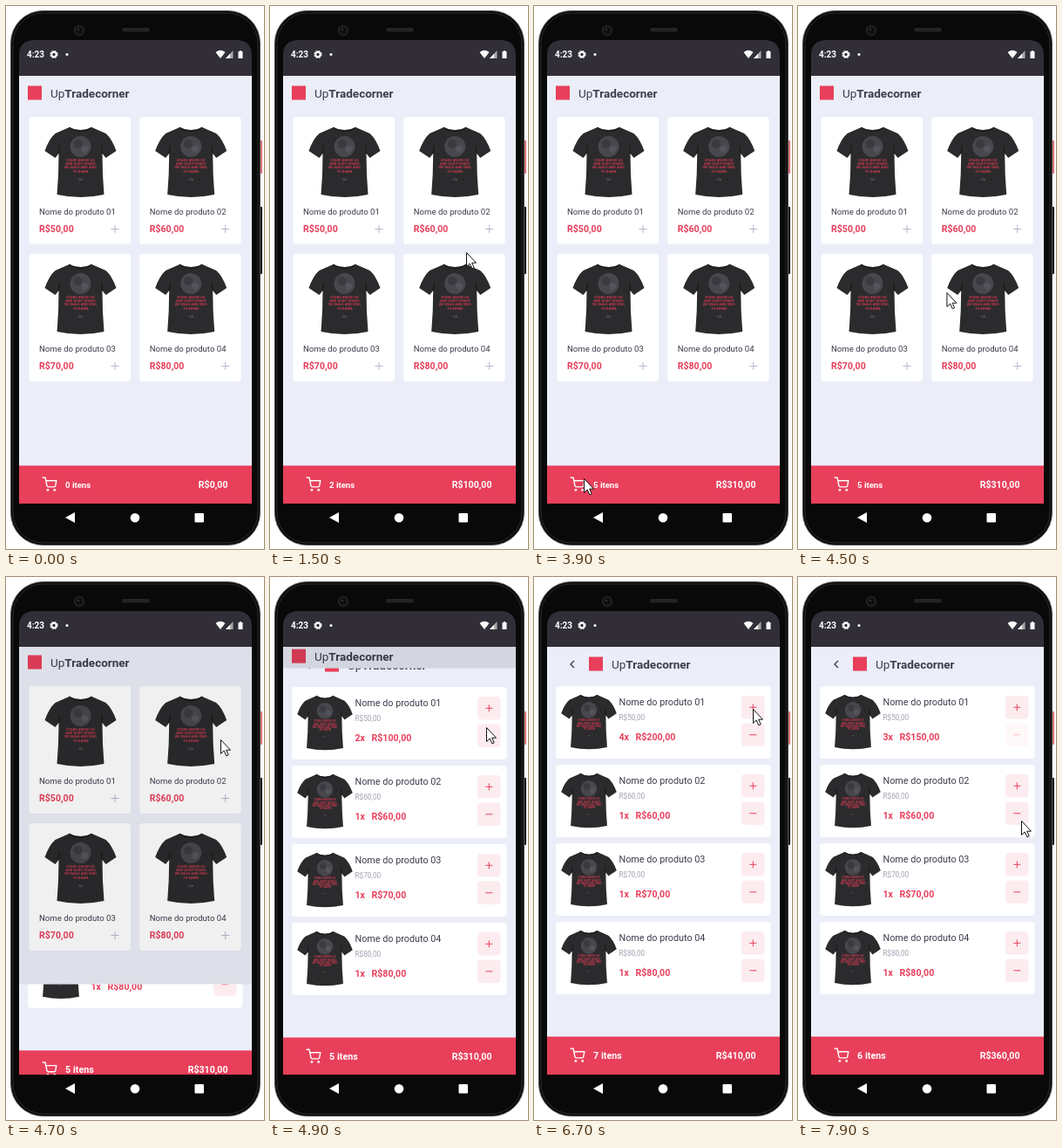
An HTML page for the animation above (8 s loop, 296 by 622 pixels).

```html
<!DOCTYPE html>
<html lang="pt-BR">
<head>
<meta charset="utf-8">
<style>
html, body { margin: 0; width: 100%; height: 100%; overflow: hidden; background: #fff; }
svg { font-family: Roboto, sans-serif; }
body > svg { display: block; }
</style>
</head>
<body>
<svg id="stage" width="296" height="622" viewBox="0 0 296 622"></svg>
<script>
const LOOP = 8000, STEP = 100;
const RED = '#e83f5b', INK = '#3d3d4d', PAGE = '#ebeef8';
const TOP = 80, BOTTOM = 570, HEIGHT = BOTTOM - TOP;
const OPEN_AT = 4677, OPEN_MS = 425;
const prices = [50, 60, 70, 80];

// time, product, change in quantity
const orders = [[800, 0, 1], [1200, 0, 1], [2000, 1, 1], [2600, 2, 1], [3300, 3, 1],
  [5800, 0, 1], [6500, 0, 1], [7700, 0, -1]];
// start, end, button sign
const presses = [[5500, 5700, 1], [6200, 6400, 1], [7700, 8000, -1]];
// time, x, y of the pointer tip
const route = [[200, 296, 350], [600, 127, 256], [1200, 127, 256], [1500, 225, 282],
  [1800, 253, 256], [2100, 253, 256], [2500, 127, 412], [2700, 127, 412], [3000, 254, 412],
  [3300, 254, 412], [3800, 57, 541], [4200, 57, 541], [4700, 246, 186], [5200, 251, 151],
  [6700, 251, 151], [7000, 254, 182], [7500, 254, 182], [7900, 256, 279]];

const money = n => `R$${n},00`;
const rect = (x, y, w, h, fill, r = 0, extra = '') =>
  `<rect x="${x}" y="${y}" width="${w}" height="${h}" rx="${r}" fill="${fill}" ${extra}/>`;
const circle = (x, y, r, fill) => `<circle cx="${x}" cy="${y}" r="${r}" fill="${fill}"/>`;
const path = (d, fill, extra = '') => `<path d="${d}" fill="${fill}" ${extra}/>`;
const line = (d, color, width = 1) => path(d, 'none', `stroke="${color}" stroke-width="${width}"`);
const text = (x, y, size, s, fill, weight = 400, anchor = 'start') =>
  `<text x="${x}" y="${y}" font-size="${size}" fill="${fill}" font-weight="${weight}" text-anchor="${anchor}">${s}</text>`;
const group = (x, y, k, body) => `<g transform="translate(${x} ${y}) scale(${k})">${body}</g>`;
const sign = (x, y, r, plus, color) =>
  line(`M${x - r} ${y}h${2 * r}` + (plus ? `M${x} ${y - r}v${2 * r}` : ''), color);

const shirt =
  path('M-13 1Q0 7 13 1L29 8Q36 14 41 28L29 36L25 31Q25 55 27 78Q0 84-27 78Q-25 55-25 31L-29 36L-41 28Q-36 14-29 8Z', '#2b2b2d') +
  line('M-13 1Q0 10 13 1M-25 31L-24 22M25 31L24 22', '#1b1b1d', 1.5) +
  circle(0, 23, 12, '#47474d') + circle(-3, 20, 5, '#3a3a40') + circle(5, 26, 4, '#54545b') +
  ['STARS ABOVE US', 'AND QUIET ROADS', 'WE WALK AND SING', 'TO DAWN'].map((s, i) =>
    text(0, 39.5 + i * 4.4, 4, s, '#c53a4e', 700, 'middle')).join('') +
  text(0, 61.5, 3, 'LUA', '#77777c', 400, 'middle');

function title(x) {
  return rect(x, 91.5, 16, 16, RED) +
    `<text x="${x + 26}" y="104.7" font-size="13.5" fill="${INK}">Up<tspan font-weight="700">Tradecorner</tspan></text>`;
}

function footer(counts, size) {
  const items = counts.reduce((a, b) => a + b);
  const total = counts.reduce((a, n, i) => a + n * prices[i], 0);
  const cart = '<g fill="none" stroke="#fff" stroke-width="2" stroke-linecap="round" stroke-linejoin="round">' +
    '<circle cx="9" cy="21" r="1"/><circle cx="20" cy="21" r="1"/>' +
    '<path d="M1 1h4l2.7 13.4a2 2 0 0 0 2 1.6h9.7a2 2 0 0 0 2-1.6L23 6H6"/></g>';
  return rect(15, 526.5, 267, 60, RED) + group(41.5, 539.5, .71, cart) +
    text(68, 552, size, items + ' itens', '#fff', 700) +
    text(254.5, 552.3, 10.6, money(total), '#fff', 700, 'end');
}

function home(counts) {
  const cards = prices.map((price, i) => group(i % 2 * 126.7, (i >> 1) * 157, 1,
    rect(26.5, 127, 116.5, 146, '#fff', 4) + group(85.5, 138, 1, shirt) +
    text(38, 238.5, 9.6, 'Nome do produto 0' + (i + 1), INK) +
    text(38, 259.3, 10.6, money(price), RED, 700) + sign(125, 255.5, 4.5, true, '#b7b7cc')));
  return rect(15, 60, 267, 550, PAGE) + title(25) + cards.join('') + footer(counts, 9.6);
}

function button(y, plus, opacity) {
  return `<g opacity="${opacity}">` + rect(238, y, 26.5, 26.5, '#fdecef', 4) +
    sign(251.3, y + 13.3, 4, plus, RED) + '</g>';
}

function cart(counts, t) {
  const rows = prices.map((price, i) => {
    const pressed = s => i === 0 && presses.some(p => t >= p[0] && t < p[1] && p[2] === s) ? .35 : 1;
    return group(0, i * 90, 1,
      rect(25, 125, 246.5, 83, '#fff', 4) + group(63, 134.5, .775, shirt) +
      text(97.5, 147, 10.8, 'Nome do produto 0' + (i + 1), INK) +
      text(97.5, 164, 8.2, money(price), '#a0a0b2') +
      text(97.5, 186.7, 10.6, counts[i] + 'x', RED, 700) +
      text(116.5, 186.7, 10.6, money(counts[i] * price), RED, 700) +
      button(136, true, pressed(1)) + button(167.5, false, pressed(-1)));
  });
  return rect(15, 60, 267, 550, PAGE) + line('M46 96l-4 4l4 4', INK, 1.4) + title(63) +
    rows.join('') + footer(counts, 10.8);
}

// Screen area from y down, with its content moved by shift
const view = (y, shift, body) =>
  `<svg x="15" y="${y}" width="267" height="${BOTTOM - y}" viewBox="15 ${y - shift} 267 ${BOTTOM - y}">${body}</svg>`;

function ease(x) {
  if (x <= 0 || x >= 1) return x <= 0 ? 0 : 1;
  const curve = (s, a, b) => 3 * s * (1 - s) ** 2 * a + 3 * s * s * (1 - s) * b + s ** 3;
  let lo = 0, hi = 1;
  for (let i = 0; i < 24; i++) {
    const mid = (lo + hi) / 2;
    if (curve(mid, .20833, .25) < x) lo = mid; else hi = mid;
  }
  return curve(lo, .82, 1);
}

function screens(t) {
  const counts = [0, 0, 0, 0];
  for (const [at, i, n] of orders) if (t >= at) counts[i] += n;
  const p = ease((t - OPEN_AT) / OPEN_MS), rest = 1 - p;
  let out = '';
  if (p < 1) out += view(TOP, -.019 * HEIGHT * p, home(counts));
  if (p > 0 && p < 1) out += rect(15, TOP, 267, HEIGHT, '#000', 0, `opacity="${.1 * Math.min(1, p / .36)}"`);
  if (p > 0) out += view(TOP + HEIGHT * rest, .041 * HEIGHT * rest, cart(counts, t));
  return out;
}

function pointer(t) {
  if (t < route[0][0]) return '';
  const n = route.findIndex(r => r[0] > t);
  const b = route[n < 0 ? route.length - 1 : n], a = n < 0 ? b : route[n - 1];
  const k = n < 0 ? 0 : (t - a[0]) / (b[0] - a[0]);
  return group(a[1] + (b[1] - a[1]) * k, a[2] + (b[2] - a[2]) * k, 1,
    path('M.5.5V16.5L4.2 13L6.8 18.8L9.2 17.8L6.7 12.2H11.5Z', '#fff', 'stroke="#111"'));
}

function gear(x, y) {
  const teeth = `<circle cx="${x}" cy="${y}" r="3.6" fill="none" stroke="#fff" stroke-width="2" stroke-dasharray="1.9 .93"/>`;
  return teeth + `<circle cx="${x}" cy="${y}" r="2.6" fill="none" stroke="#fff" stroke-width="1.8"/>`;
}

const phone =
  rect(290, 154, 4, 38, '#d9737a', 1) + rect(290, 230, 4, 77, '#151515', 1) +
  rect(5.5, 5.5, 286, 612, '#090909', 37, 'stroke="#555"') +
  rect(8, 8, 281, 607, 'none', 35, 'stroke="#2c2c2c"') +
  circle(84, 28, 6.5, '#1d1d20') + circle(84, 28, 3.5, '#0b0b10') + circle(83, 27, 1.2, '#34343c') +
  rect(133, 25, 32, 4.5, '#242424', 2.2) +
  path('M15 80V57Q15 39 33 39H264Q282 39 282 57V80Z', '#312e38') +
  text(24, 59, 10, '4:23', '#fff', 700) + gear(55, 55.5) + circle(70, 55.5, 1.5, '#fff') +
  path('M240.5 53Q246 48.500 251.500 53L246 60Z', '#fff') +
  path('M252 60L260.500 51V60Z', '#aaa') + path('M252 60L257 54.700V60Z', '#fff') +
  path('M266.500 52H268V51H270V52H271.500V60H266.500Z', '#fff') +
  path('M79 580V592L68 586Z', '#fff') + circle(148, 586.3, 5.3, '#fff') + rect(216.5, 581, 10.5, 10.5, '#fff', 1);

const stage = document.getElementById('stage');
let shown = -1;
function draw(now) {
  const t = Math.floor(now % LOOP / STEP) * STEP;
  if (t !== shown) {
    stage.innerHTML = phone + screens(t) + pointer(t);
    shown = t;
  }
  requestAnimationFrame(draw);
}
draw(0);
</script>
</body>
</html>
```
